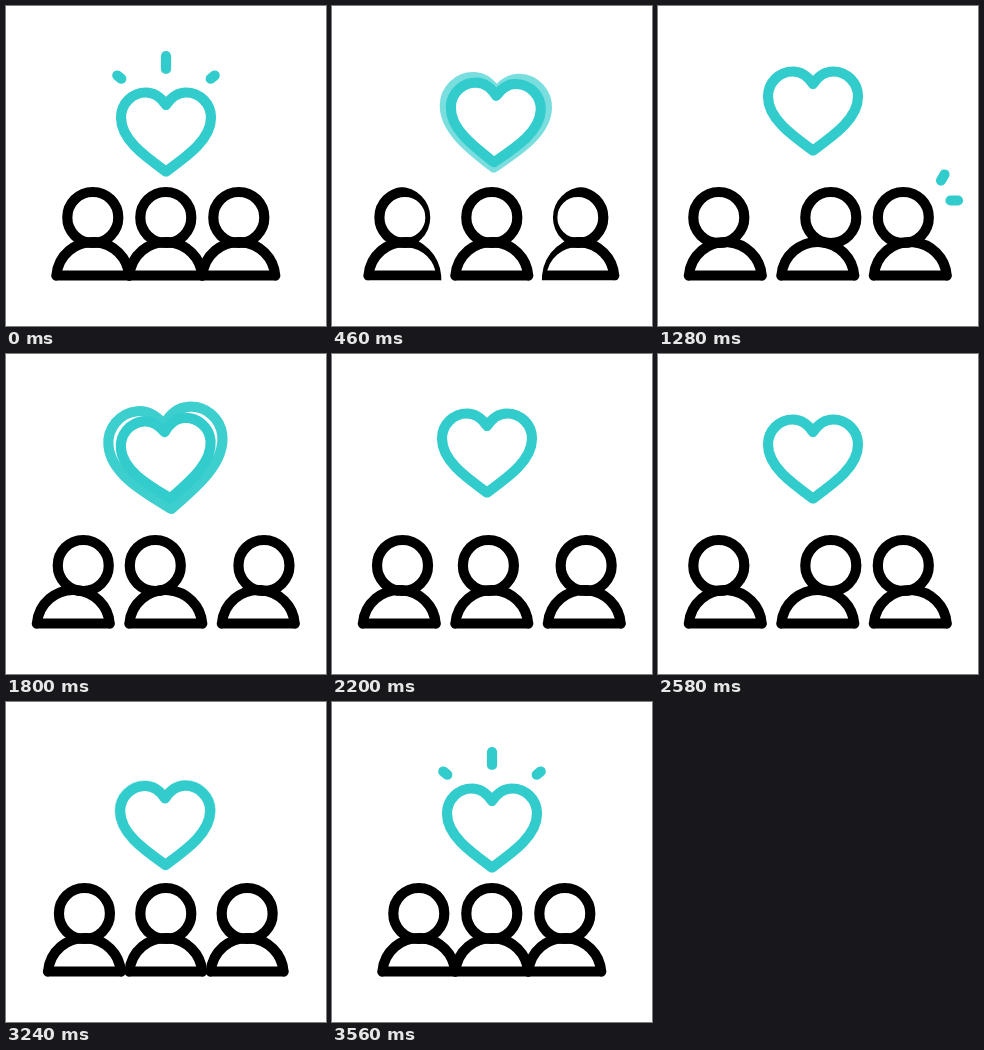
These frames come from a looping animation (320x320 px, 3.6 s). An HTML page with a canvas:

```html
<!DOCTYPE html>
<html lang="en">
<head>
<meta charset="utf-8">
<title>Community love</title>
<style>
  html, body { margin: 0; width: 100%; height: 100%; overflow: hidden; background: #fff; }
  canvas { display: block; width: 320px; height: 320px; }
</style>
</head>
<body>
<canvas id="stage" width="320" height="320"></canvas>
<script>
const ctx = document.getElementById('stage').getContext('2d');
const LOOP = 3600, STEP = 20, BEAT = 1200;
const TEAL = '#33cccc', BLACK = '#000';
const LINE = 10.2, CENTER = 159.8;

const clamp = v => Math.max(0, Math.min(1, v));
const ease = v => (1 - Math.cos(Math.PI * clamp(v))) / 2;
const progress = (t, from, to) => ease((t - from) / (to - from));
const bell = (t, peak, reach) => ease(1 - Math.abs(t - peak) / reach);

// sway: head shift for a lean one way, back: for a lean the other way
const people = [
  { side: -1, sway: -6.5, back: -12.3 },
  { side: 0, sway: 13, back: 13 },
  { side: 1, sway: -7, back: -7 }
];

// how the heart tilts and drifts at the top of each beat
const beats = [
  { tilt: 4, drift: 11 },
  { tilt: -5, drift: 6 },
  { tilt: -8, drift: -2.6 }
];

function heartPath(scale) {
  const half = side => {
    const x = v => v * side * scale, y = v => v * scale;
    const path = new Path2D();
    path.moveTo(0, y(-27));
    path.bezierCurveTo(x(6), y(-36), x(13), y(-39.5), x(20), y(-39.5));
    path.bezierCurveTo(x(34), y(-39.5), x(45), y(-28), x(45), y(-14.5));
    path.bezierCurveTo(x(45), y(8), x(20), y(25), 0, y(39.5));
    return path;
  };
  const path = half(-1);
  path.addPath(half(1));
  return path;
}

function bodyPath(x, pad = 0) {
  const path = new Path2D();
  path.arc(x, 272.5, 36.5 + pad, Math.PI * 1.025, Math.PI * 1.975);
  path.lineTo(x + 36.5 + pad, 269.5 + pad);
  path.lineTo(x - 36.5 - pad, 269.5 + pad);
  path.closePath();
  return path;
}

function headPath(x, pad = 0) {
  const path = new Path2D();
  path.arc(x, 211.5, 25.5 + pad, 0, Math.PI * 2);
  return path;
}

function drawPerson({ side, sway, back }, t, lean) {
  const parting = progress(t, 220, 605 + 10 * side);
  const apart = parting * (1 - progress(t, 3000, 3440));
  const x = CENTER + side * (73 + 19.5 * apart);
  ctx.save();
  if (side && parting > 0 && parting < 1) {
    // the trailing edge is trimmed while stepping apart
    const edge = x + side * 6.5 * Math.sin(Math.PI * parting);
    const clip = headPath(edge, 5);
    clip.addPath(bodyPath(edge, 5));
    ctx.clip(clip);
  }
  ctx.lineWidth = LINE;
  ctx.strokeStyle = BLACK;
  ctx.stroke(bodyPath(x));
  ctx.stroke(headPath(x + lean * (lean > 0 ? sway : back)));
  ctx.restore();
}

function drawHeart(t) {
  const beat = Math.floor(t / BEAT);
  const pulse = bell(t % BEAT, BEAT / 2, 280);
  const lift = progress(t, 220, 740) * (1 - progress(t, 2840, 3360));
  const hop = bell(t, 2040, 240);
  const { tilt, drift } = beats[beat];

  ctx.save();
  ctx.translate(160 - 5 * lift + drift * pulse, 126 - 21 * lift - 24 * hop);
  ctx.rotate(tilt * pulse * Math.PI / 180);
  ctx.strokeStyle = TEAL;
  ctx.lineWidth = LINE;
  if (pulse > 0) {
    ctx.globalAlpha = 0.35 + 0.6 * pulse;
    ctx.stroke(heartPath(1 + 0.27 * pulse));
    ctx.globalAlpha = 1;
  }
  ctx.stroke(heartPath(1));
  ctx.restore();
}

const mirror = (rays, axis) => rays.map(([x1, y1, x2, y2]) => [axis - x1, y1, axis - x2, y2]);

const slantRay = [[115.3, 72.7, 111.3, 69.5]];
const heartRays = [[160, 63, 160, 50], ...slantRay, ...mirror(slantRay, 320)];
const rightRays = [[283, 174.5, 286.5, 168.5], [292.5, 194.5, 300, 194.5]];
const leftRays = mirror(rightRays, 327);

function drawRays(rays, size) {
  if (size <= 0) return;
  ctx.strokeStyle = TEAL;
  ctx.lineWidth = LINE * Math.min(1, size * 2);
  for (const [x1, y1, x2, y2] of rays) {
    ctx.beginPath();
    ctx.moveTo(x1, y1);
    ctx.lineTo(x1 + (x2 - x1) * size, y1 + (y2 - y1) * size);
    ctx.stroke();
  }
}

function draw(t) {
  ctx.fillStyle = '#fff';
  ctx.fillRect(0, 0, 320, 320);
  ctx.lineCap = ctx.lineJoin = 'round';

  // one and a half swings, starting and ending upright
  const swing = clamp((t - 955) / 1950);
  const lean = Math.sin(3 * Math.PI * swing);
  people.forEach(person => drawPerson(person, t, lean));

  drawHeart(t);
  drawRays(heartRays, 1 - progress(t, 220, 400) + progress(t, 3420, 3560));
  drawRays(rightRays, bell(t, 1280, 160));
  drawRays(leftRays, bell(t, 2360, 160));
}

const start = performance.now();
function frame() {
  const t = (performance.now() - start) % LOOP;
  draw(Math.floor(t / STEP) * STEP);
  requestAnimationFrame(frame);
}
frame();
</script>
</body>
</html>
```
